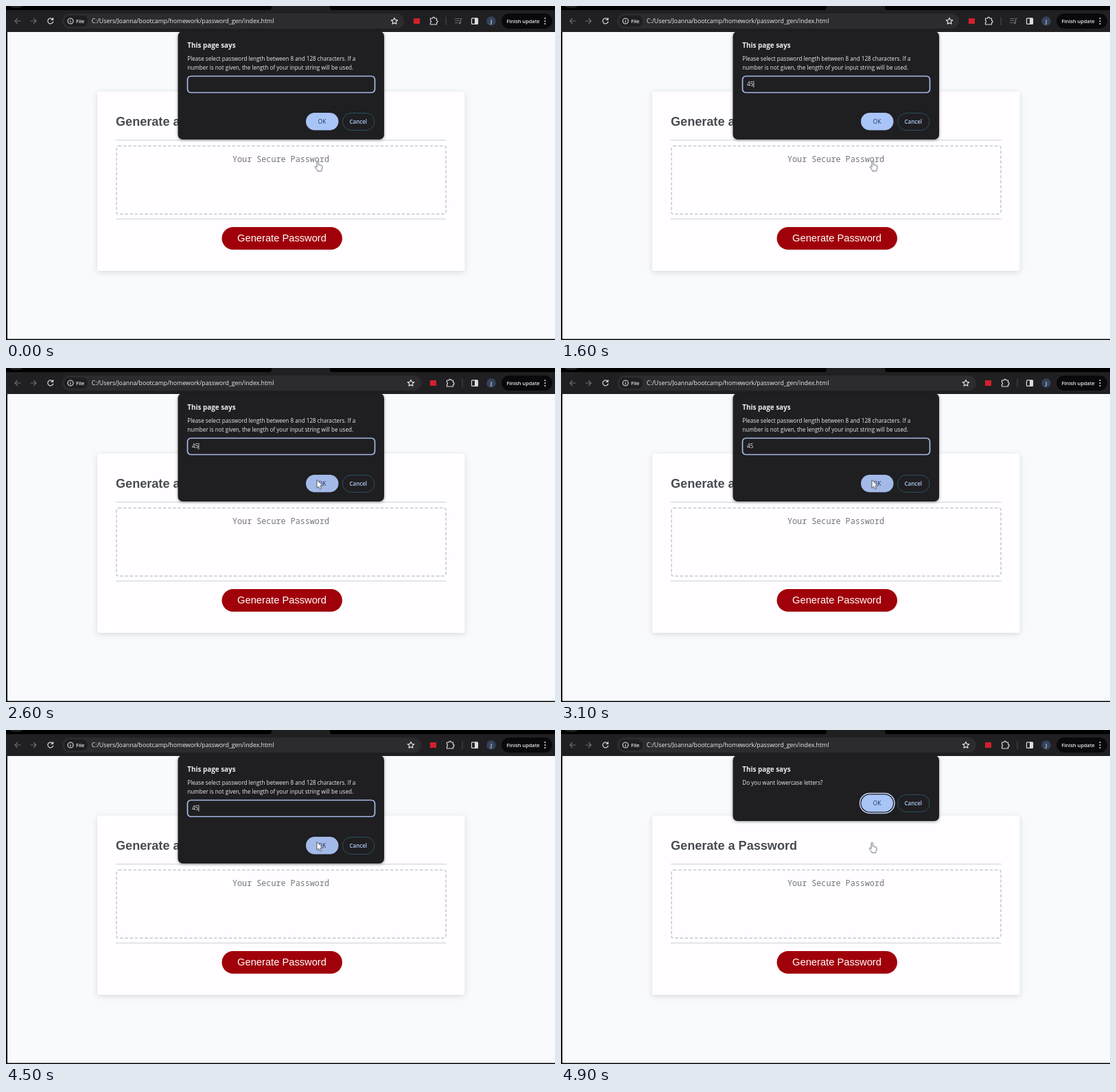
Animation, 800 px wide and 488 px high, one loop 5 s. Source, as an HTML page:

```html
<!DOCTYPE html>
<html lang="en">
<head>
<meta charset="utf-8">
<title>Password generator</title>
<style>
html, body { margin: 0; width: 100%; height: 100%; overflow: hidden; background: #000; }
svg { display: block; width: 100vw; height: 100vh; }

text { font-family: "Open Sans", "Noto Sans", sans-serif; font-size: 8.15px; font-weight: 500; fill: #ececef; }
.mid { text-anchor: middle; }
.url { font-size: 8.75px; }
.small { font-size: 7.4px; font-weight: 600; }
.says { font-size: 9.9px; font-weight: 650; }
.arial { font-family: "Liberation Sans", Arial, sans-serif; font-weight: 400; }
.heading { font-size: 18.1px; font-weight: 700; fill: #474b52; }
.action { font-size: 14.7px; fill: #fff; }
.mono { font-family: "Noto Sans Mono", "DejaVu Sans Mono", monospace; font-size: 11.75px; font-weight: 400; fill: #757579; }
.line { fill: none; stroke: #dcdde0; stroke-width: 1.2; stroke-linecap: round; stroke-linejoin: round; }
.dim { stroke: #6c6d70; }
.bar { fill: #202022; }
.card { filter: drop-shadow(0 2px 4px #0002); }
.dialog { fill: #1f1e21; filter: drop-shadow(0 1px 2px #0006); }
.ok { fill: #a9c4f7; }
.okText { fill: #1d2f56; }
.cancel { fill: none; stroke: #27535f; }
.cancelText { fill: #b4cdf8; font-size: 8px; font-weight: 600; }

/* The small negative delay keeps hard cuts clear of the 100 ms ticks. */
.anim { animation: 5s -20ms step-end infinite; }
.early { animation-name: early; }
.late { animation-name: late; }
.four { animation-name: four; }
.five { animation-name: five; }
.caret { animation-name: caret; }
.hand { animation-name: hand; }
.arrow { animation-name: arrow; }
.hover { animation-name: hover; }
.focused { animation-name: focused; }
.blurred { animation-name: blurred; }
.first { animation-name: first; transform-origin: 400px 116px; }
.second { animation-name: second; }

@keyframes early { 0% { visibility: visible } 38%, 100% { visibility: hidden } }
@keyframes late { 0% { visibility: hidden } 38%, 100% { visibility: visible } }
@keyframes four { 0% { visibility: hidden } 18%, 100% { visibility: visible } }
@keyframes five { 0% { visibility: hidden } 24%, 100% { visibility: visible } }
@keyframes caret {
  0%, 14% { opacity: 0; transform: none }
  4% { opacity: 1; transform: none }
  18% { opacity: 1; transform: translateX(4.7px) }
  24%, 44%, 64%, 84% { opacity: 1; transform: translateX(9.4px) }
  34%, 54%, 74%, 92%, 100% { opacity: 0; transform: translateX(9.4px) }
}
@keyframes hand {
  0% { opacity: 1; transform: translate(454.5px, 226.5px) }
  38% { opacity: 0; transform: translate(453.5px, 164.5px) }
  92%, 100% { opacity: 1; transform: translate(453.5px, 164.5px) }
}
@keyframes arrow {
  0% { opacity: 0; transform: translate(452px, 205px) }
  38% { opacity: 1; transform: translate(452px, 205px); animation-timing-function: steps(3) }
  44% { opacity: 1; transform: translate(437px, 152px); animation-timing-function: steps(4) }
  52% { opacity: 1; transform: translate(453px, 163.5px) }
  92%, 100% { opacity: 0; transform: translate(453px, 163.5px) }
}
@keyframes hover { 0%, 92%, 100% { fill: #a9c4f7 } 50% { fill: #a3bae9 } }
@keyframes focused { 0% { opacity: 1 } 92%, 100% { opacity: 0 } }
@keyframes blurred { 0% { opacity: 0 } 92%, 100% { opacity: 1 } }
@keyframes first {
  0% { opacity: 1; transform: none }
  92% { opacity: 1; transform: translateY(-3.7px) scale(1.004, 1.012) }
  94%, 100% { opacity: 0; transform: none }
}
@keyframes second {
  0% { opacity: 0; transform: none }
  92% { opacity: .07; transform: translateY(-7.5px) }
  94% { opacity: 1; transform: translateY(-2px) }
  96%, 100% { opacity: 1; transform: none }
}
</style>
</head>
<body>
<svg viewBox="0 0 800 488" preserveAspectRatio="none">
  <defs>
    <g id="tools">
      <path class="line" d="M566 17.3l1.4 3 3.3.4-2.4 2.2.6 3.3-2.9-1.6-2.9 1.6.6-3.3-2.4-2.2 3.3-.4z"/>
      <rect x="594" y="18" width="9" height="8" fill="#d3202c"/>
      <path class="line" d="M618.5 18h3a1.6 1.6 0 0 1 3.2 0h2.8v3.2a1.6 1.6 0 0 1 0 3.2V27h-9v-3a1.6 1.6 0 0 0 0-3z"/>
      <path d="M641 16v12" stroke="#4a4b4f"/>
    </g>
    <g id="cancel">
      <rect class="cancel" x="490.5" y="156.5" width="46.5" height="25" rx="12.5"/>
      <text class="cancelText mid" x="513.3" y="171.6">Cancel</text>
    </g>
  </defs>

  <!-- browser bar -->
  <rect width="800" height="488" fill="#000"/>
  <rect class="bar" y="6" width="800" height="32"/>
  <path class="bar" d="M383 6q4 0 4-4V0h85v2q0 4 4 4z"/>
  <path class="bar" d="M5 0h20q-3 3-10 3T5 0z"/>
  <path class="line dim" d="M21 22h-8m3.5-3.5L13 22l3.5 3.5M36 22h8m-3.5-3.5L44 22l-3.5 3.5"/>
  <path class="line" d="M68 19.4a4 4 0 1 0 .7 3.6M68.6 17.5v2.7h-2.7"/>
  <rect class="anim early" x="82" y="11" width="498" height="22" rx="11" fill="#2c2c2e"/>
  <rect class="anim late" x="82" y="11" width="523" height="22" rx="11" fill="#2c2c2e"/>
  <rect x="85" y="14" width="34" height="16" rx="8" fill="#1e1e20"/>
  <circle class="line" cx="94" cy="22" r="4"/>
  <path class="line" d="M94 21.8v2M94 20v.1"/>
  <text class="small" x="102" y="24.8">File</text>
  <text class="url" x="124.8" y="25.1">C:/Users/Joanna/bootcamp/homework/password_gen/index.html</text>
  <g class="anim early">
    <use href="#tools"/>
    <path class="line dim" d="M654.5 18.5h6M654.5 21.5h6M654.5 24.5h3.5M664.5 18.5h-2v6"/>
    <circle cx="661.2" cy="24.8" r="1.6" fill="#6c6d70"/>
  </g>
  <g class="anim late"><use href="#tools" x="24"/></g>
  <rect class="line" x="678.5" y="17.8" width="9" height="8.6" rx="1"/>
  <path d="M683 17.8h4.5v8.6H683z" fill="#dcdde0"/>
  <circle cx="707" cy="22" r="6.8" fill="#33435c"/>
  <text class="small mid" x="707" y="24.8">J</text>
  <rect x="722" y="11" width="74" height="22" rx="11" fill="#09090b"/>
  <text class="small" x="729.5" y="24.7">Finish update</text>
  <path d="M785.5 18v.1M785.5 22v.1M785.5 26v.1" stroke="#ececef" stroke-width="2" stroke-linecap="round"/>

  <!-- page -->
  <rect x="2" y="38" width="798" height="448.5" fill="#f8fafd"/>
  <rect class="card" x="133" y="125" width="535.5" height="262" rx="3" fill="#fffdff"/>
  <text class="arial heading" x="160" y="175.3">Generate a Password</text>
  <path d="M160 196h481.5M160 311.3h481.5" stroke="#dcdde2" stroke-width="1.5"/>
  <rect x="161" y="204.5" width="480" height="99.5" rx="3" fill="none" stroke="#c5c7cd" stroke-width="1.5" stroke-dasharray="4.4 2.8"/>
  <text class="mono mid" x="400.5" y="227.5">Your Secure Password</text>
  <rect x="314.5" y="323" width="175.5" height="33" rx="16.5" fill="#a00009"/>
  <text class="arial action mid" x="402" y="344.3">Generate Password</text>

  <!-- length prompt -->
  <g class="anim first">
    <rect class="dialog" x="250.5" y="37" width="300.5" height="158" rx="7"/>
    <text class="says" x="264.3" y="60.8">This page says</text>
    <text x="264.3" y="80">Please select password length between 8 and 128 characters. If a</text>
    <text x="264.3" y="93.3">number is not given, the length of your input string will be used.</text>
    <rect class="anim blurred" x="264.5" y="102.5" width="273" height="24" rx="5" fill="none" stroke="#65666b"/>
    <rect class="anim focused" x="264.5" y="102.5" width="273" height="24" rx="5" fill="none" stroke="#a6bce8" stroke-width="1.7"/>
    <text x="271" y="117"><tspan class="anim four">4</tspan><tspan class="anim five">5</tspan></text>
    <path class="anim caret" d="M271.3 109.5v9.5" stroke="#ececef" stroke-width=".9"/>
    <rect class="ok anim hover" x="437" y="156" width="47.5" height="25.5" rx="12.75"/>
    <text class="okText mid" x="460.5" y="171.6">OK</text>
    <use href="#cancel"/>
  </g>

  <!-- lowercase confirm -->
  <g class="anim second">
    <rect class="dialog" x="250.5" y="37" width="300.5" height="96" rx="7"/>
    <text class="says" x="264.3" y="60.8">This page says</text>
    <text x="264.3" y="80">Do you want lowercase letters?</text>
    <rect x="435.5" y="92.5" width="50.5" height="29" rx="14.5" fill="none" stroke="#c3d4f5" stroke-width="1.5"/>
    <rect class="ok" x="437.5" y="94.5" width="46.5" height="25" rx="12.5"/>
    <text class="okText mid" x="460.5" y="110">OK</text>
    <use href="#cancel" y="-62"/>
  </g>

  <!-- pointers -->
  <path class="anim arrow" d="M0 0v12l2.7-2.5 1.8 4 2-.9-1.7-3.9h3.7z" fill="#fff" stroke="#222" stroke-width=".7"/>
  <path class="anim hand" d="M-1.4 9V1.2a1.2 1.2 0 0 1 2.4 0V5.5l4.2.9q1.4.4 1.3 1.8l-.5 3.6q-.2 1-.9 1.6v1.4H-.8v-1.4L-4 9.4q-.8-1.2.3-1.6 1-.2 2.3 1.2z" fill="#fff" stroke="#55565a" stroke-width=".9"/>
</svg>
</body>
</html>
```
